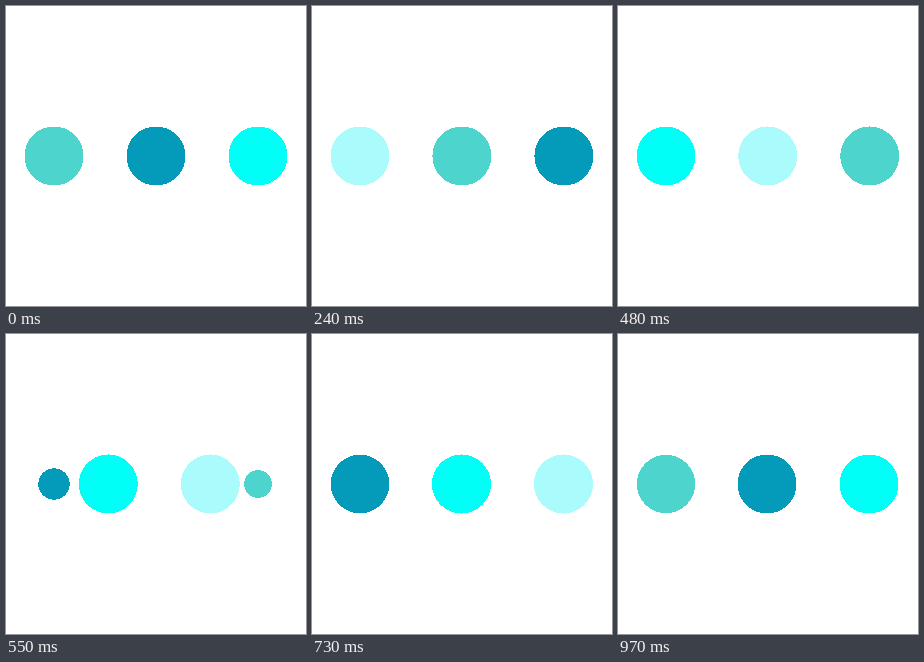
Recreate the animation shown at these times as an HTML page. Size 300x300 px, loop 1000 ms.

```html
<!DOCTYPE html>
<html lang="en">
<head>
<meta charset="utf-8">
<title>Loading dots</title>
<style>
html, body { margin: 0; width: 100%; height: 100%; overflow: hidden; background: #fff; }
svg { display: block; width: 100%; height: 100%; }
</style>
</head>
<body>
<svg viewBox="0 0 300 300" shape-rendering="crispEdges"></svg>
<script>
const LOOP = 1000, STEPS = 33, R = 29.53, LEFT = 48, GAP = 102;
const COLORS = ['#00fff6', '#aafbfc', '#4dd4cc', '#049bbb'];
const svg = document.querySelector('svg');

function addDot(fill) {
  const dot = document.createElementNS('http://www.w3.org/2000/svg', 'circle');
  dot.setAttribute('cy', 150);
  dot.setAttribute('fill', fill);
  return svg.appendChild(dot);
}

function place(dot, x, r) {
  dot.setAttribute('cx', x);
  dot.setAttribute('r', r);
}

// cubic-bezier(0, .5, .5, 1)
function ease(p) {
  let lo = 0, hi = 1;
  for (let i = 0; i < 24; i++) {
    const s = (lo + hi) / 2;
    if (1.5 * s * s - 0.5 * s ** 3 < p) lo = s; else hi = s;
  }
  return 1.5 * lo - 0.5 * lo ** 3;
}

const leaving = addDot(COLORS[0]);
const dots = COLORS.map(addDot);

function draw(ms) {
  // 30 ms steps, with one 40 ms step in the middle
  const step = Math.floor((ms - (ms >= 510 ? 10 : 0)) / 30);
  const t = step / STEPS * 4;
  const phase = Math.floor(t);
  const e = ease(t - phase);

  // each dot waits, grows on the left, then moves right twice
  dots.forEach((dot, k) => {
    const stage = (phase + k) % 4;
    if (stage === 0) place(dot, LEFT, 0);
    else if (stage === 1) place(dot, LEFT, R * e);
    else place(dot, LEFT + GAP * (stage - 2 + e), R);
  });

  // the waiting dot's colour shrinks away on the right
  leaving.setAttribute('fill', COLORS[(4 - phase) % 4]);
  place(leaving, LEFT + 2 * GAP, R * (1 - e));
}

function tick() {
  draw(performance.now() % LOOP);
  requestAnimationFrame(tick);
}
tick();
</script>
</body>
</html>
```
